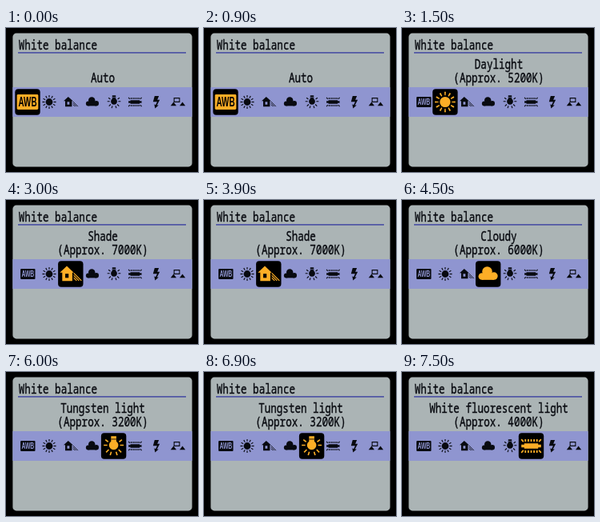
An HTML page that plays this animation: 240x180 px, repeating every 8000 ms.

```html
<!DOCTYPE html>
<html lang="en">
<head>
<meta charset="utf-8">
<title>White balance menu</title>
<style>
  html, body { margin: 0; width: 100%; height: 100%; overflow: hidden; background: #000; }
  svg { display: block; width: 100vw; height: 100vh; color: #080a10; --hole: #8f95d0; }
  text { font: 12.6px "Noto Sans Mono", "DejaVu Sans Mono", monospace; fill: #080a10; }
  .label { text-anchor: middle; }
  .label, .title { stroke: #080a10; stroke-width: .3; }
  .awb { font: bold 10px "Liberation Sans", Arial, sans-serif; fill: var(--hole); text-anchor: middle; }
  .solid { fill: currentColor; }
  .hole { fill: var(--hole); }
  .line { fill: none; stroke: currentColor; }
  .choice { visibility: hidden; animation: show 8s step-end infinite; animation-delay: calc(var(--i) * 1.5s - 8s); }
  .choice.last { animation-name: show-last; animation-delay: 0s; }
  .cursor { color: #fdae26; --hole: #000; transform: translate(calc(27px + var(--i) * 26.9px), 92.5px); }
  @keyframes show { 0% { visibility: visible; } 18.75%, 100% { visibility: hidden; } }
  @keyframes show-last { 0% { visibility: hidden; } 93.75%, 100% { visibility: visible; } }
</style>
</head>
<body>
<svg viewBox="0 0 240 180">
  <defs>
    <rect id="box" x="-15.7" y="-16.2" width="31.4" height="32.4" rx="4"/>
    <g id="auto">
      <rect class="solid" x="-9.2" y="-6.6" width="18.4" height="13.2" rx="1"/>
      <text class="awb" transform="scale(.68 1.1)" y="3.6">AWB</text>
    </g>
    <g id="sun">
      <circle class="solid" r="4.4"/>
      <!-- twelve evenly spaced rays -->
      <circle class="line" r="7" pathLength="120" stroke-width="3" stroke-dasharray="3 7" stroke-dashoffset="1.5"/>
    </g>
    <g id="shade">
      <path class="solid" d="M-9-1.2-3.2-6.6 2.6-1.2H1.4V5.8H-7V-1.2Z"/>
      <path class="hole" d="M-4.5-.2h2.8v3.4h-2.8z"/>
      <path class="line" stroke-width=".8" d="M2.6-.8 9 5.6M2.6 1.2 7 5.6M2.6 3.2 5 5.6"/>
    </g>
    <g id="cloud" class="solid">
      <circle cx="-.8" cy="-2" r="4.2"/>
      <circle cx="-5.2" cy="2" r="2.9"/>
      <circle cx="4.8" cy="1.7" r="3.2"/>
      <path d="M-5.2 0H4.8V4.9H-5.2Z"/>
    </g>
    <g id="bulb">
      <path class="solid" d="M-2.2-8.2h4.4v4.3a3.9 3.9 0 1 1-4.4 0Z"/>
      <path class="hole" d="M-2.2-6h4.4v.6h-4.4z"/>
      <path class="line" stroke-width="1.1" d="M-8.3-.7h3m10.6 0h3M-6.9-5.2l2.3 1.7m9.2 0 2.3-1.7M-6.3 5.2l2.2-2.2m8.2 0 2.2 2.2M-2.9 7.6l.9-2.8m4 0 .9 2.8"/>
    </g>
    <g id="tube">
      <path class="solid" d="M-5.8-2.2H5.8V-1.2H8.2V1.2H5.8V2.2H-5.8V1.2H-8.2V-1.2H-5.8Z"/>
      <path class="line" stroke-width="1.1" d="M-8.2-5.6l1.7 2m13 0 1.7-2M-8.2 5.6l1.7-2m13 0 1.7 2"/>
      <!-- a row of ticks on each side -->
      <path class="line" stroke-width="2" stroke-dasharray="1.2 1.2" d="M-5.4-4.6H5.4M-5.4 4.6H5.4"/>
    </g>
    <g id="flash">
      <path class="solid" d="M-2.2-7.6H3.1L1.2-2.7H4.2L.7 4H2.8L-1.7 8-2.7 2.7-1 3.7.9-.3H-4.2Z"/>
    </g>
    <g id="custom">
      <path class="solid" d="M-5.4-5.4h7.8v5.8h-7.8zM-9.2 4.8l3.6-4.8L-2 4.8ZM2 4.8l3.6-4.8L9.2 4.8Z"/>
      <path class="hole" d="M-4.3-4.3h5.6v3.6h-5.6z"/>
    </g>
  </defs>

  <rect x="8.4" y="6.6" width="224.2" height="166.8" rx="4.5" fill="#abb4b5"/>
  <text class="title" transform="translate(15.8 27) scale(1 1.23)">White balance</text>
  <path d="M15 30.8H225" stroke="#5157a5" stroke-width="1.8"/>
  <rect x="8.4" y="74" width="224.2" height="37" fill="#8f95d0"/>

  <use href="#auto" x="27.3" y="92.5"/>
  <use href="#sun" x="54" y="92.5"/>
  <use href="#shade" x="81" y="92.5"/>
  <use href="#cloud" x="108" y="92.5"/>
  <use href="#bulb" x="135" y="92.5"/>
  <use href="#tube" x="161.3" y="92.5"/>
  <use href="#flash" x="188" y="92.5"/>
  <use href="#custom" x="215" y="92.5"/>

  <g class="choice" style="--i:0">
    <text class="label" transform="translate(121 68) scale(1 1.23)">Auto</text>
    <g class="cursor"><use href="#box" color="#000"/><use href="#auto" transform="scale(1.45)"/></g>
  </g>
  <g class="choice" style="--i:1">
    <text class="label" transform="translate(121 50.7) scale(1 1.23)">Daylight</text>
    <text class="label" transform="translate(121 68) scale(1 1.23)">(Approx. 5200K)</text>
    <g class="cursor"><use href="#box"/><use href="#sun" transform="scale(1.5)"/></g>
  </g>
  <g class="choice" style="--i:2">
    <text class="label" transform="translate(121 50.7) scale(1 1.23)">Shade</text>
    <text class="label" transform="translate(121 68) scale(1 1.23)">(Approx. 7000K)</text>
    <g class="cursor"><use href="#box"/><use href="#shade" transform="scale(1.5)"/></g>
  </g>
  <g class="choice" style="--i:3">
    <text class="label" transform="translate(121 50.7) scale(1 1.23)">Cloudy</text>
    <text class="label" transform="translate(121 68) scale(1 1.23)">(Approx. 6000K)</text>
    <g class="cursor"><use href="#box"/><use href="#cloud" transform="scale(1.5)"/></g>
  </g>
  <g class="choice" style="--i:4">
    <text class="label" transform="translate(121 50.7) scale(1 1.23)">Tungsten light</text>
    <text class="label" transform="translate(121 68) scale(1 1.23)">(Approx. 3200K)</text>
    <g class="cursor"><use href="#box"/><use href="#bulb" transform="scale(1.5)"/></g>
  </g>
  <g class="choice last" style="--i:5">
    <text class="label" transform="translate(121 50.7) scale(1 1.23)">White fluorescent light</text>
    <text class="label" transform="translate(121 68) scale(1 1.23)">(Approx. 4000K)</text>
    <g class="cursor"><use href="#box"/><use href="#tube" transform="scale(1.5)"/></g>
  </g>
</svg>
</body>
</html>
```
